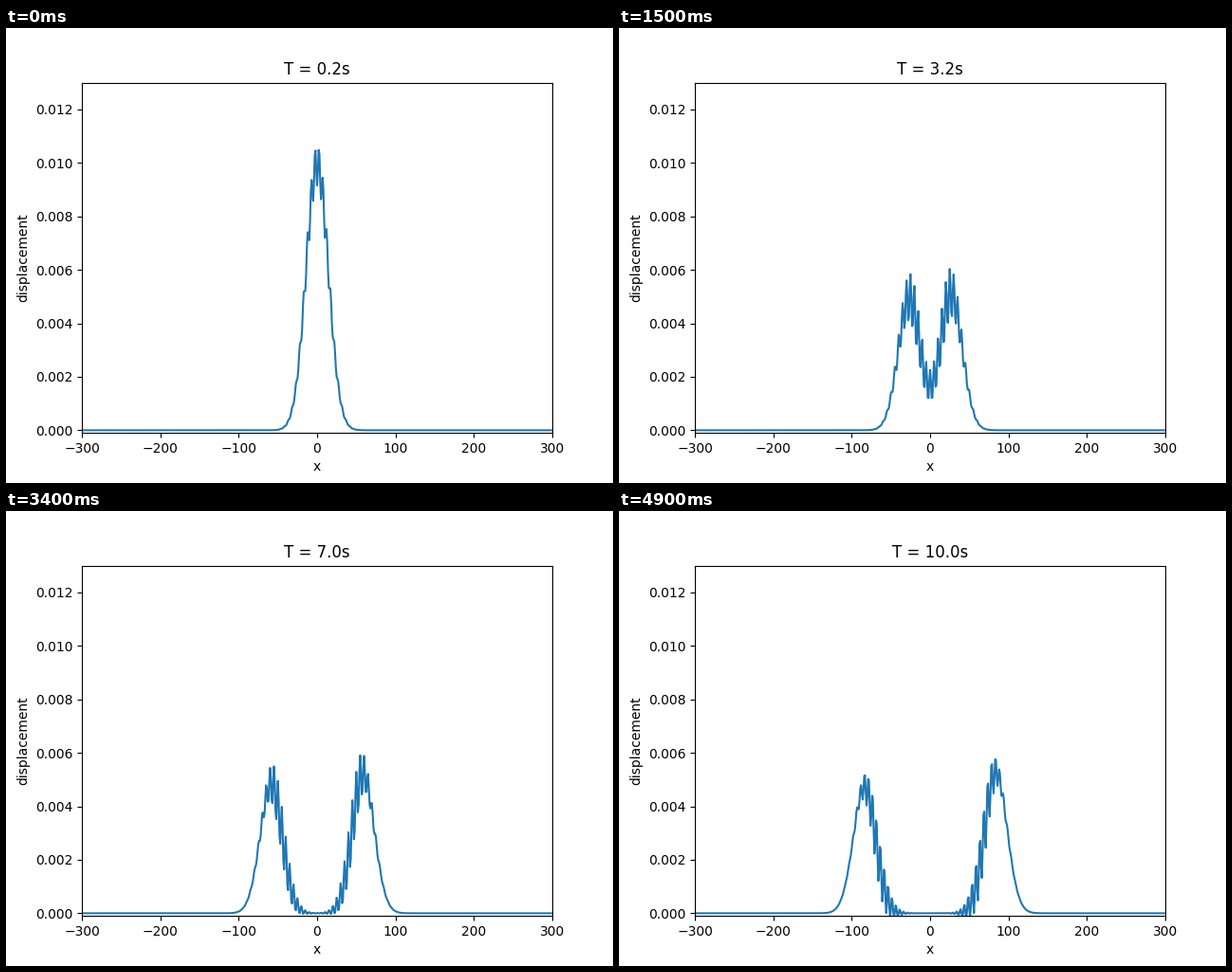
A matplotlib script that plays this animation: 640 by 480 pixels, repeating every 5000 ms.

```python
import numpy as np
import matplotlib.pyplot as plt
from matplotlib.animation import FuncAnimation

FRAMES = 50
INTERVAL = 100      # ms
TIME_STEP = 0.2     # simulated seconds per frame
SPEED = 8.39        # long-wave speed, sites per second
GAIN = 0.00066      # growth per site towards the right

plt.rcParams["font.family"] = "DejaVu Sans"

# Chain of unit-spaced masses released from rest with a rippled Gaussian.
x = np.arange(-300, 301)
start = 0.01 * np.exp(-(x / 20) ** 2) * (1 + 0.2 * np.cos(2 * np.pi * x / 5))
spectrum = np.fft.rfft(start)
wavenumber = 2 * np.pi * np.fft.rfftfreq(x.size)
omega = 2 * SPEED * np.sin(wavenumber / 2)


def displacement(t):
    modes = spectrum * np.cos(omega * t)
    return np.fft.irfft(modes, x.size) * np.exp(GAIN * x)


fig, ax = plt.subplots(figsize=(6.4, 4.8), dpi=100)
line, = ax.plot(x, start)
ax.set_xlim(-300, 300)
ax.set_ylim(-0.0001, 0.013)
ax.set_xlabel("x")
ax.set_ylabel("displacement")
title = ax.set_title("")


def update(frame):
    t = TIME_STEP * (frame + 1)
    line.set_ydata(displacement(t))
    title.set_text(f"T = {t:.1f}s")
    return line, title


anim = FuncAnimation(fig, update, frames=FRAMES, interval=INTERVAL,
                     repeat=True, repeat_delay=0)
plt.show()
```
